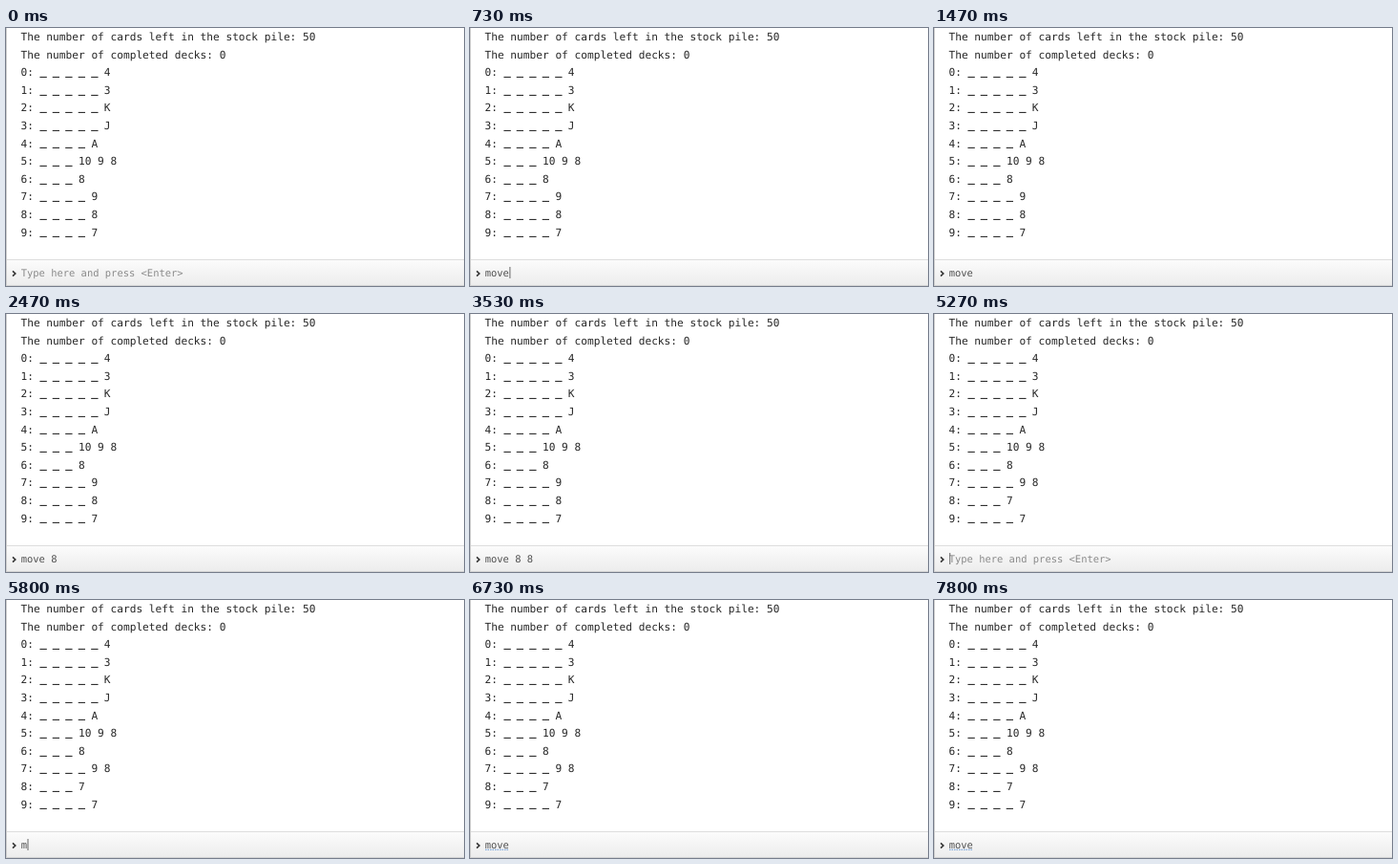
An HTML page for the animation above (8 s loop, 480 by 270 pixels).

```html
<!DOCTYPE html>
<html lang="en">
<head>
<meta charset="utf-8">
<title>Card console</title>
<style>
  html, body { margin: 0; width: 100%; height: 100%; overflow: hidden; background: #fff; }
  svg { display: block; width: 100vw; height: 100vh; }
  text {
    font-family: "DejaVu Sans Mono", monospace;
    white-space: pre;
    text-rendering: geometricPrecision;
    fill: #262626;
  }
  #log text { font-size: 11.17px; }
  .hidden { stroke: #262626; stroke-width: .6px; }
  #entry { font-size: 10.46px; fill: #505050; }
  #entry.hint { fill: #8a8a8a; }
</style>
</head>
<body>
<svg viewBox="0 0 480 270">
  <defs>
    <linearGradient id="shade" x2="0" y2="1">
      <stop offset="0" stop-color="#fcfcfc"/>
      <stop offset="1" stop-color="#ececec"/>
    </linearGradient>
  </defs>
  <rect width="480" height="270" fill="#fff"/>
  <g id="log"></g>
  <rect y="242" width="480" height="28" fill="url(#shade)"/>
  <rect y="242" width="480" height="1" fill="#dedede"/>
  <rect y="269" width="480" height="1" fill="#d4d4d4"/>
  <rect width="1" height="270" fill="#d0d0d0"/>
  <path d="M7 254.3L9.8 257L7 259.7" fill="none" stroke="#333" stroke-width="1.6"/>
  <text id="entry" x="15.7" y="260"></text>
  <path id="spell" d="M16 261.3H41" stroke="#7fa9dc" stroke-width="1.2" stroke-dasharray="1.5 1"/>
  <rect id="caret" y="250" width="1" height="12" fill="#666"/>
</svg>
<script>
const LOOP = 8000, HINT = "Type here and press <Enter>", MOVED = 5270;
const $ = id => document.getElementById(id);

const lines = [
  "The number of cards left in the stock pile: 50",
  "The number of completed decks: 0",
  ..."_ _ _ _ _ 4|_ _ _ _ _ 3|_ _ _ _ _ K|_ _ _ _ _ J|_ _ _ _ A|_ _ _ 10 9 8|_ _ _ 8|_ _ _ _ 9|_ _ _ _ 8|_ _ _ _ 7"
    .split("|").map((cards, i) => `${i}: ${cards}`)
];
// face-down cards are bold dashes set a little above the usual underscore
const markup = line => line.replace(/((?:_ )+)(.*)/,
  '<tspan class="hidden" dy="-1.3">$1</tspan><tspan dy="1.3">$2</tspan>');

const rows = lines.map((line, i) => {
  const row = document.createElementNS("http://www.w3.org/2000/svg", "text");
  row.setAttribute("x", 15.5);
  row.setAttribute("y", 13.1 + i * 18.59);
  row.innerHTML = markup(line);
  $("log").append(row);
  return row;
});

// [time, typed text, caret visible]
const keys = [
  [0, "", 0], [70, "m", 1], [170, "mo", 1], [270, "mov", 1], [730, "move", 1],
  [930, "move ", 1], [1470, "move ", 0],
  [1800, "move 8", 1], [1930, "move 8 ", 1], [2470, "move 8 ", 0],
  [2870, "move 8 8", 1], [3000, "move 8 8 ", 1], [3530, "move 8 8 ", 0],
  [4000, "move 8 8 ", 1], [4530, "move 8 8 ", 0], [4930, "move 8 8 7", 1],
  [MOVED, "", 1], [5730, "m", 1], [5870, "mo", 1], [5930, "mov", 1], [6000, "move", 1],
  [6270, "move ", 1], [6730, "move ", 0], [7270, "move ", 1], [7800, "move ", 0]
];

function draw(t) {
  const [, typed, caretOn] = keys.findLast(k => k[0] <= t);
  const moved = t >= MOVED;
  rows[9].innerHTML = markup(moved ? "7: _ _ _ _ 9 8" : lines[9]);
  rows[10].innerHTML = markup(moved ? "8: _ _ _ 7" : lines[10]);
  $("entry").textContent = typed || HINT;
  $("entry").classList.toggle("hint", !typed);
  $("caret").setAttribute("x", 16.2 + typed.length * 6.3);
  $("caret").setAttribute("opacity", caretOn);
  $("spell").setAttribute("opacity", t >= 6270 ? 1 : 0);
}

const start = performance.now();
function tick() {
  draw((performance.now() - start) % LOOP);
  requestAnimationFrame(tick);
}
tick();
</script>
</body>
</html>
```
